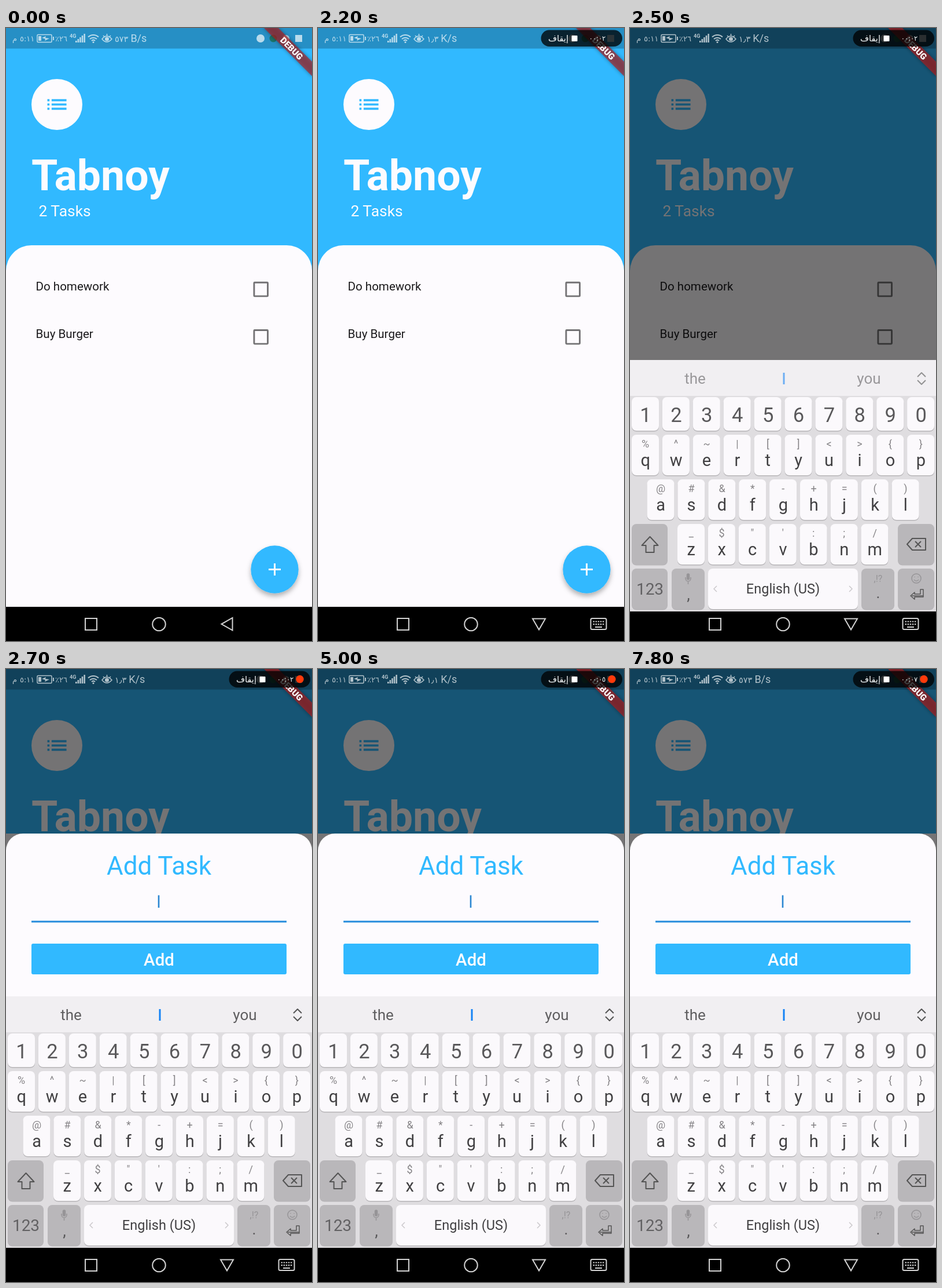
Recreate the animation shown at these times as an HTML page. Size 529x1058 px, loop 8 s.

```html
<!DOCTYPE html>
<html lang="en">
<head>
<meta charset="utf-8">
<title>To-do list</title>
<style>
  html, body { margin: 0; width: 100%; height: 100%; overflow: hidden; background: #000; }
  svg { display: block; width: 529px; height: 1058px; font-family: Roboto, sans-serif; }
  .mid { text-anchor: middle; }
  .ar { font-family: "DejaVu Sans", sans-serif; }
  .line { fill: none; stroke: #d2d2d2; stroke-width: 2; }
  .glyph { fill: none; stroke: #555; stroke-width: 2; stroke-linejoin: round; }
</style>
</head>
<body>
<svg viewBox="0 0 529 1058">
  <defs>
    <filter id="soft" x="-30%" y="-30%" width="160%" height="160%">
      <feDropShadow dx="0" dy="5" stdDeviation="4" flood-opacity=".3"/>
    </filter>
    <filter id="edge" x="-10%" y="-50%" width="120%" height="200%">
      <feGaussianBlur stdDeviation="3"/>
    </filter>
  </defs>

  <rect width="529" height="1000" fill="#31b9ff"/>
  <rect width="529" height="35.5" fill="#268fc5"/>
  <circle cx="88" cy="132" r="44" fill="#fdfbfe"/>
  <path transform="translate(66 110) scale(1.836)" fill="#31b9ff"
    d="M3 11h2v2H3zM3 15h2v2H3zM3 7h2v2H3zM7 11h14v2H7zM7 15h14v2H7zM7 7h14v2H7z"/>
  <g fill="#fdfbfe">
    <text x="44" y="280" font-size="73.4" font-weight="700">Tabnoy</text>
    <text x="56.5" y="325" font-size="26.4">2 Tasks</text>
    <path d="M0 999V419a44 44 0 0 1 44-44h441a44 44 0 0 1 44 44v580z"/>
  </g>
  <g font-size="20.57" fill="#1b1a1c">
    <text x="51.5" y="453">Do homework</text>
    <text x="51.5" y="535">Buy Burger</text>
  </g>
  <g fill="none" stroke="#747375" stroke-width="2.9">
    <rect x="428.9" y="439.3" width="23.6" height="23.6" rx="1"/>
    <rect x="428.9" y="521.5" width="23.6" height="23.6" rx="1"/>
  </g>
  <circle cx="464.5" cy="934.5" r="41.2" fill="#31b9ff" filter="url(#soft)"/>
  <path d="M454 934.5h21M464.5 924v21" stroke="#fdfbfe" stroke-width="3"/>

  <rect id="dim" width="529" height="999" fill-opacity=".54"/>

  <g id="sheet">
    <rect width="529" height="281" fill="#757475"/>
    <path d="M0 281V29.4a29.4 29.4 0 0 1 29.4-29.4h470.2a29.4 29.4 0 0 1 29.4 29.4V281z" fill="#fdfbfe"/>
    <text class="mid" x="264.5" y="71" font-size="44" fill="#31b9ff">Add Task</text>
    <rect id="caret" x="262.7" y="106.5" width="2.6" height="21.5" fill="#2a86d2"/>
    <path id="underline" d="M44 152h441"/>
    <rect x="44" y="190" width="441" height="53" rx="3" fill="#31b9ff"/>
    <text class="mid" x="264.5" y="228" font-size="29.4" font-weight="500" fill="#fdfbfe">Add</text>
  </g>

  <rect y="999" width="529" height="59"/>
  <g id="keyboard">
    <rect y="565" width="529" height="434" fill="#dfdde0"/>
    <rect y="565" width="529" height="62" fill="#f1eff2"/>
    <g id="suggestions">
      <g class="mid" font-size="26" fill="#5f5e60">
        <text x="112.5" y="606">the</text>
        <text x="413" y="606">you</text>
      </g>
      <rect x="264.5" y="587" width="3" height="20" fill="#1583f5"/>
      <path class="glyph" d="M497 594l7-7 7 7M497 600l7 7 7-7" stroke-width="1.6"/>
    </g>
    <g id="keys"></g>
    <g class="glyph">
      <path d="M34.500 870l-14 15h7v12h14v-12h7z"/>
      <path d="M488 873h23v20h-23l-9-10zM493 878l10 10M503 878l-10 10"/>
      <path d="M507 961v11h-20M492 966l-7 6 7 6v-4h15v-13h-5v8h-10z" stroke-width="1.5"/>
      <g stroke="#969497" stroke-width="1.5">
        <path d="M96 940v2a4.500 5 0 0 0 9 0v-2M100.500 948v4"/>
        <rect x="98.500" y="934" width="4" height="10" rx="2" fill="#969497"/>
        <circle cx="495" cy="942" r="8"/>
        <path d="M491 944a4.500 4.500 0 0 0 8 0M492 939v1M498 939v1"/>
      </g>
      <path d="M150 955l-5 5 5 5M379 955l5 5-5 5" stroke="#cbc9cc" stroke-width="1.5"/>
    </g>
  </g>

  <g class="line">
    <rect x="137" y="1019" width="20" height="20"/>
    <circle cx="264.500" cy="1029" r="11.300"/>
    <path id="back" d="M391.500 1018v21.500l-19-10.700z"/>
    <g id="down">
      <path d="M371 1019.500h22l-11 19z"/>
      <rect x="471.500" y="1019" width="27" height="19" rx="2.500"/>
      <path d="M475.500 1024.500h19M475.500 1029h19" stroke-dasharray="2.500 1.600"/>
      <path d="M479 1034h12"/>
    </g>
  </g>

  <g fill="#fff" opacity=".68">
    <g class="ar" font-size="13">
      <text x="11" y="23">م</text>
      <text x="24" y="23">٥:١١</text>
      <text x="85" y="23">٪٢٦</text>
    </g>
    <g fill="none" stroke="#fff" stroke-width="1.500">
      <rect x="54" y="11.500" width="25" height="13" rx="1.500"/>
      <path d="M82 15v6" stroke-width="2"/>
      <path d="M142 15.500a13 13 0 0 1 18 0M145 19a9 9 0 0 1 12 0M148 22a4.500 4.500 0 0 1 6 0" stroke-width="2"/>
      <path d="M166 19q8-10 17 0q-9 10-17 0zM168 13l2 2M174.500 10v3M181 13l-2 2"/>
    </g>
    <path d="M56 14h5v8h-5zM62 17l7-3-1 3 7 1-8 4 1-3z"/>
    <circle cx="151" cy="24.500" r="1.500"/><circle cx="174.500" cy="19" r="3.500"/>
    <text x="110" y="17" font-size="9" font-weight="700">4G</text>
    <path d="M120 22h2.500v3H120zM123.600 19h2.500v6h-2.500zM127.200 16h2.500v9h-2.500zM130.800 13h2.500v12h-2.500zM134.400 10h2.500v15h-2.500z"/>
    <text x="188" y="24" font-size="18"><tspan id="speed" class="ar" font-size="14.500"></tspan><tspan id="unit" dx="4"></tspan></text>
    <circle cx="440" cy="18" r="7"/>
    <circle cx="462" cy="18" r="6.500" fill="#17683f"/>
    <circle cx="484" cy="18" r="6"/>
    <rect x="500" y="12" width="12" height="12"/>
  </g>

  <g transform="translate(529 0) rotate(45)">
    <rect x="-59" y="41.100" width="118" height="17.600" fill-opacity=".35" filter="url(#edge)"/>
    <rect x="-59" y="41.100" width="118" height="17.600" fill="#b71c1c" fill-opacity=".63"/>
    <text class="mid" y="55.200" font-size="15" font-weight="900" fill="#fff">DEBUG</text>
  </g>

  <g id="recorder">
    <rect x="385.500" y="3.500" width="140.500" height="28.500" rx="14.200" fill-opacity=".76"/>
    <g class="mid ar" fill="#fff">
      <text x="415.500" y="23" font-size="14.500">إيقاف</text>
      <text id="clock" x="483" y="22" font-size="11.500"></text>
    </g>
    <rect x="438.500" y="13" width="10" height="10" rx="1" fill="#fff"/>
    <circle id="dot" cx="508" cy="17.500" r="6.700" fill="#ff3a0b"/>
  </g>
</svg>

<script>
const LOOP = 8000;
const $ = id => document.getElementById(id);
const show = (id, on) => $(id).style.display = on ? '' : 'none';
const escapeText = s => s.replace(/&/g, '&amp;').replace(/</g, '&lt;');

function label(text, x, y, size, color) {
  return `<text class="mid" x="${x}" y="${y}" font-size="${size}" fill="${color}">${escapeText(text)}</text>`;
}
function key(x, y, w, h, color = '#fbf9fc') {
  const box = (dy, fill) => `<rect x="${x}" y="${y + dy}" width="${w}" height="${h}" rx="8" fill="${fill}"/>`;
  return box(1.5, '#b7b5b8') + box(0, color);
}
function letterRow(letters, hints, x0, y) {
  return [...letters].map((c, i) => {
    const x = x0 + i * 52.9, mid = x + 23.7;
    return key(x, y, 47, 70) + label(hints[i], mid, y + 22, 18, '#858386') + label(c, mid, y + 54, 29, '#414042');
  }).join('');
}

function buildKeys() {
  const grey = '#b9b7ba';
  let out = [...'1234567890'].map((c, i) =>
    key(3 + i * 52.9, 629, 47, 58) + label(c, 27 + i * 52.9, 672, 34.5, '#59585a')).join('');
  out += letterRow('qwertyuiop', '%^~|[]<>{}', 3, 694);
  out += letterRow('asdfghjkl', '@#&*-+=()', 29.5, 771);
  out += letterRow('zxcvbnm', '_$"\':;/', 82, 848);
  for (const [x, y, w] of [[3, 848, 62], [463, 848, 63], [3, 925, 62], [72, 925, 57], [400, 925, 57], [463, 925, 63]])
    out += key(x, y, w, 70, grey);
  out += key(135, 925, 259, 70);
  out += label('123', 34.5, 970, 28, '#626163') + label('English (US)', 264.5, 968, 23.5, '#414042');
  out += label(',', 101, 979, 28, '#59585a') + label('.', 429, 976, 26, '#59585a') + label(',!?', 429, 948, 16, '#969497');
  $('keys').innerHTML = out;
}

const easeOut = p => 1 - (1 - Math.min(p, 1)) ** 2;

// The caret toggles every half second, fading for 250 ms.
function caretOpacity(t) {
  if (t < 3030) return 1;
  const phase = (t - 30) % 1000;
  return phase < 500 ? 1 - easeOut(phase / 250) : easeOut((phase - 500) / 250);
}

function draw(t) {
  const [speed, unit] = t >= 100 && t < 3100 ? ['١٫٣', 'K/s'] : t >= 3100 && t < 6100 ? ['١٫١', 'K/s'] : ['٥٧٣', 'B/s'];
  $('speed').textContent = speed;
  $('unit').textContent = unit;

  show('recorder', t >= 100);
  $('recorder').style.opacity = t < 300 ? 0.6 : 1;
  $('clock').textContent = '٠٠:٠' + '٠١٢٣٤٥٦٧'[Math.floor(t / 1000)];
  show('dot', (t + 400) % 1000 < 500);

  show('back', t < 2100);
  show('down', t >= 2100);
  show('dim', t >= 2400);
  show('sheet', t >= 2400);
  show('keyboard', t >= 2500);

  const raised = t >= 2700;
  $('sheet').setAttribute('transform', `translate(0 ${raised ? 284 : 718})`);
  $('underline').setAttribute('stroke', raised ? '#248bdc' : '#a5a3a6');
  $('underline').setAttribute('stroke-width', raised ? 3 : 1.5);
  $('caret').setAttribute('opacity', caretOpacity(t));

  const settling = t < 2600;
  $('keyboard').setAttribute('transform', `translate(0 ${settling ? 8 : 0})`);
  $('suggestions').setAttribute('opacity', settling ? 0.6 : 1);
}

buildKeys();
const start = performance.now();
function tick() {
  draw((performance.now() - start) % LOOP);
  requestAnimationFrame(tick);
}
tick();
</script>
</body>
</html>
```
